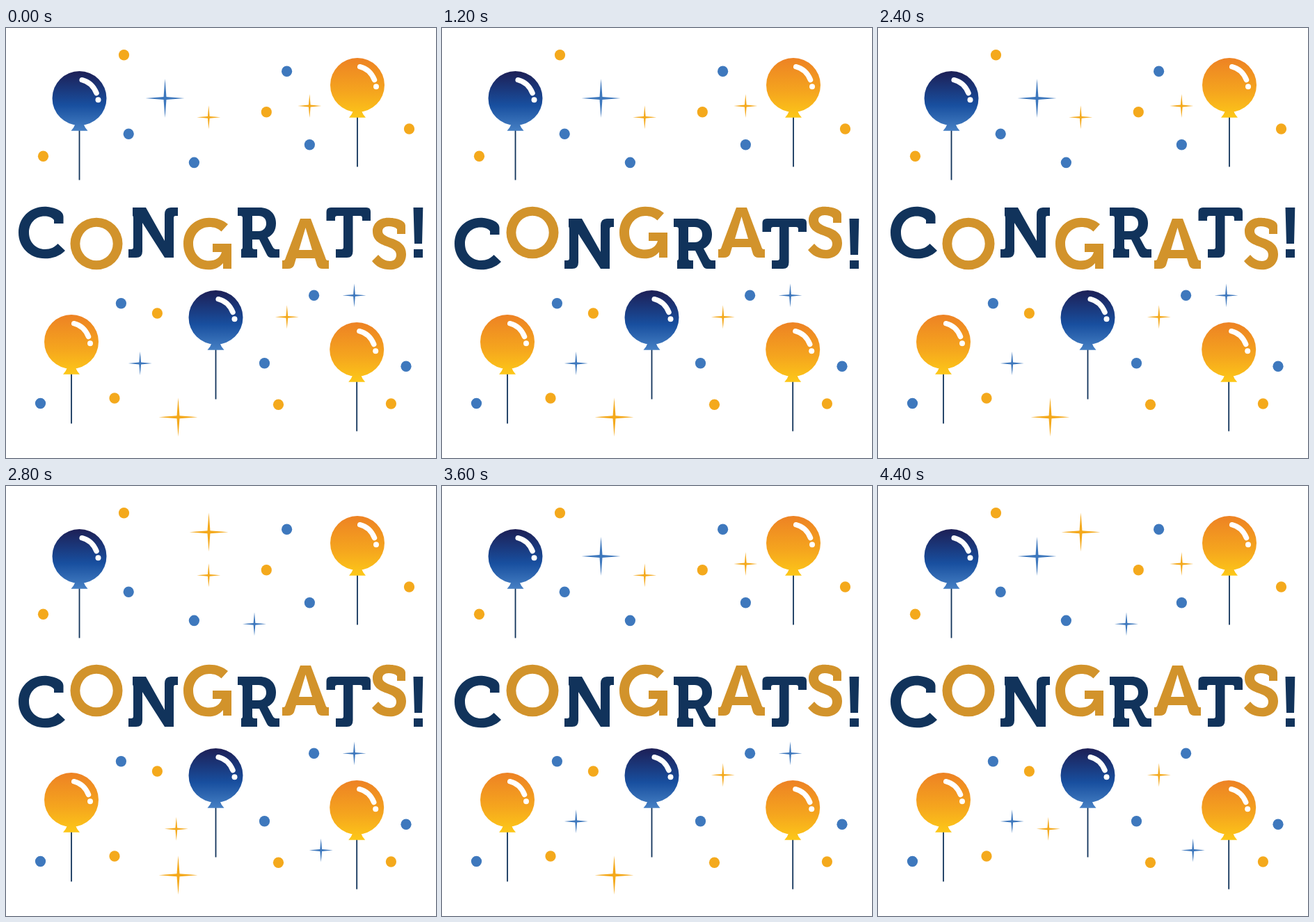
These frames come from a looping animation (618x618 px, 4.8 s). An HTML page with a canvas:

```html
<!DOCTYPE html>
<html lang="en">
<head>
<meta charset="utf-8">
<title>Congrats</title>
<style>
  html, body { margin: 0; width: 100%; height: 100%; overflow: hidden; background: #fff; }
  canvas { display: block; }
</style>
</head>
<body>
<canvas id="stage" width="618" height="618" aria-label="Congrats!"></canvas>
<script>
const ctx = document.getElementById('stage').getContext('2d');
const BLUE = '#3e78bd', GOLD = '#f4a91c', NAVY = '#11335b', OCHRE = '#d2932b';
const STEP = 400, LOOP = 4800, HOP = 16;

// Letter outlines in their raised position.
const letters = [
  'M82.5 281H69V276C66 272 61 270.5 55.5 270.5C42 270.5 33 281 33 294C33 308 43 318 56 318C64 318 70 315 74.5 310L85 320C77 328 67 331.3 56 331.3C34 331.3 18 315 18 294C18 273 34 256.7 55.5 256.7C66 257 82.5 261 82.5 271Z',
  'M92.5 294A37.5 37.3 0 0 1 167.5 294A37.5 37.3 0 0 1 92.5 294ZM106.3 294A23.7 24.3 0 0 0 153.7 294A23.7 24.3 0 0 0 106.3 294Z',
  'M182 258H201L228 306V268Q228 258 237 258H247V270H243.5Q241 270 241 273V330H228L196 280V321Q196 330 187 330H176V318H180Q183 318 183 315V273Q183 270 182 270Z',
  'M319 266L309.5 276.5C305 272 299 270 292 270C279 270 269 281 269 294C269 308 279 318.5 291.5 318.5C301 318.5 308 314 310 306H297V294H324V330H312V322C307 328 300 331.3 291 331.3C270 331.3 255 315 255 294C255 273 271 256.7 292 256.7C303 256.7 312 260 319 266Z',
  'M333 258H364C380 258 388 268 388 281C388 291 383 298 376 301L383 314Q385 318 388 318H393V330H381Q377 330 375 326L364 304H354V315Q354 318 357 318H361V330H338V318Q340 318 340 315V273Q340 270 337 270H333ZM354 270V292H363C370 292 374 287 374 281C374 274 370 270 363 270Z',
  'M423 258H438L459 314Q460 318 462 318H464V330H455Q449 330 447 325L444 315H417L414 325Q412 330 405 330H397V318H399Q401 318 402 314ZM430.5 271L421 303H440Z',
  'M467 258H518Q524 258 524 264V277H512V273Q512 270 509 270H498.5V321Q498.5 330 490 330H474V318H482Q485 318 485 315V270H476Q473 270 473 273V277H460.5V264Q460.5 258 467 258Z',
  'M574 280H562V273C559 270 555 269 550 269C544 269 541 272 541 276C541 281 546 283 553 286C566 290 575 296 575 309C575 323 565 331.3 552 331.3C541 331.3 532 327 526 319L535 310C540 316 546 319 552 319C558 319 561 315 561 310C561 304 556 301 548 298C536 294 527 289 527 276C527 265 536 256.7 549 256.7C560 256.7 574 260 574 268Z',
  'M585.5 258H599.3L598 310H587ZM586 318H599V330H586Z'
].map(d => new Path2D(d));

const balloons = [[105.5, 101, BLUE], [505, 82, GOLD], [94, 451, GOLD], [301.5, 416, BLUE], [504.2, 462, GOLD]];

const confetti = {
  [GOLD]: [[169.5, 38.7], [53.5, 184.3], [374.3, 120.7], [579.5, 145], [217.4, 410], [156, 532], [391.5, 541.3], [553.4, 540]],
  [BLUE]: [[176.2, 152.2], [270.4, 193.4], [403.6, 62.3], [436.4, 167.7], [165.4, 395.7], [442.6, 384.3], [371.5, 481.8], [575, 486.3], [49.5, 539.5]]
};

// x, y, half length, colour, beat (of three) on which the star is hidden
const stars = [
  [228.5, 101, 28, BLUE, 1], [291.5, 66.3, 28, GOLD, 0], [247.5, 559.3, 28, GOLD, 2],
  [291.3, 128.3, 17, GOLD, 2], [436.3, 112, 17, GOLD, 1], [357, 198.3, 17, BLUE, 0],
  [192.7, 482, 17, BLUE, 1], [244.8, 492.8, 17, GOLD, 0], [403.8, 415.3, 17, GOLD, 1],
  [500.5, 384.3, 17, BLUE, 2], [452.7, 523.5, 17, BLUE, 0]
];

function disc(x, y, rx, ry = rx) {
  ctx.beginPath();
  ctx.ellipse(x, y, rx, ry, 0, 0, Math.PI * 2);
  ctx.fill();
}

function drawBalloon([x, y, color]) {
  ctx.save();
  ctx.translate(x, y);
  ctx.fillStyle = NAVY;
  ctx.fillRect(-0.9, 46, 1.8, 71.5);
  const fill = ctx.createLinearGradient(0, -39, 0, 47);
  const stops = color === BLUE ? ['#1d1f55', '#184f9f', '#4680c4'] : ['#ed8224', '#f5a51e', '#fdc818'];
  stops.forEach((stop, i) => fill.addColorStop([0, 0.57, 1][i], stop));
  ctx.fillStyle = fill;
  disc(0, 0, 39);
  ctx.fill(new Path2D('M-6 37H6Q8 43 12 46.8H-12Q-8 43 -6 37Z'));
  ctx.strokeStyle = ctx.fillStyle = '#fff';
  ctx.lineWidth = 7.5;
  ctx.lineCap = 'round';
  ctx.stroke(new Path2D('M3.7 -26.3Q18 -23 24.5 -7.5'));
  disc(27, 2.3, 4);
  ctx.restore();
}

function drawStar([x, y, size, color]) {
  const inner = size > 20 ? 2 : 1.4;
  ctx.fillStyle = color;
  ctx.beginPath();
  for (let i = 0; i < 8; i++) {
    const angle = i * Math.PI / 4, r = i % 2 ? inner * Math.SQRT2 : size;
    ctx.lineTo(x + r * Math.cos(angle), y + r * Math.sin(angle));
  }
  ctx.fill();
}

function drawLetters(beat) {
  letters.forEach((path, i) => {
    ctx.save();
    ctx.translate(0, (i + beat) % 2 * HOP);
    ctx.fillStyle = i % 2 ? OCHRE : NAVY;
    ctx.fill(path);
    ctx.restore();
  });
}

function draw(now) {
  const beat = Math.floor(now % LOOP / STEP);
  ctx.fillStyle = '#fff';
  ctx.fillRect(0, 0, 618, 618);
  for (const color in confetti) {
    ctx.fillStyle = color;
    confetti[color].forEach(([x, y]) => disc(x, y, 7.6, 7.8));
  }
  stars.filter(star => star[4] !== beat % 3).forEach(drawStar);
  balloons.forEach(drawBalloon);
  drawLetters(beat);
}

const start = performance.now();
function tick() {
  draw(performance.now() - start);
  requestAnimationFrame(tick);
}
tick();
</script>
</body>
</html>
```
